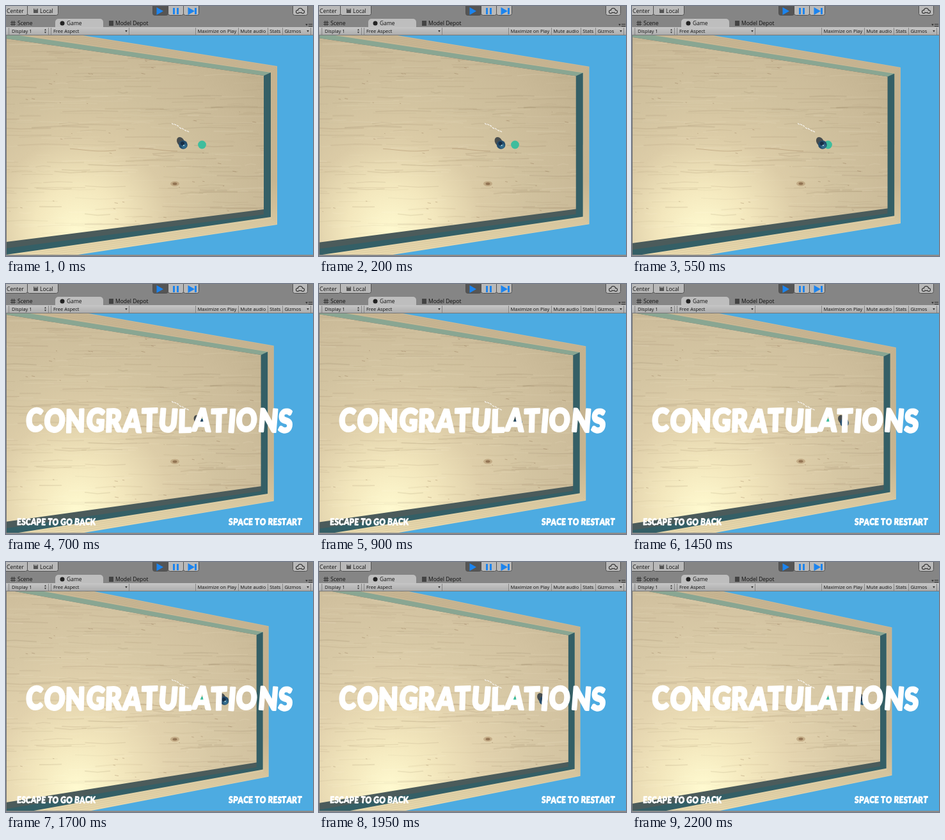
Animation, 480 px wide and 391 px high, one loop 2.25 s. Source, as an HTML page with a canvas:

```html
<!DOCTYPE html>
<html lang="en">
<head>
<meta charset="utf-8">
<title>Tray game</title>
<style>
html, body { margin: 0; width: 100%; height: 100%; overflow: hidden; background: #4dabe1; }
canvas { display: block; }
</style>
</head>
<body>
<canvas id="stage" width="480" height="391"></canvas>
<script>
const c = document.getElementById('stage').getContext('2d');
const LOOP = 2250, STEP = 50, WIN_AT = 700;
let turn = 0; // how far the tray has turned, 0 to 1

function random(seed) {
  return () => (seed = (seed * 16807) % 2147483647) / 2147483647;
}

// Tray coordinates to stage coordinates as the camera turns
function project([x, y]) {
  return [
    x - 15 * turn * Math.max(0, x - 280) / 123,
    217 + (y - 217) * (1 + turn * (0.06 - 0.12 * x / 403))
  ];
}

function fillPath(fill, points) {
  c.beginPath();
  points.forEach(p => c.lineTo(...p));
  c.fillStyle = fill;
  c.fill();
}

function stroke(color, width, ...points) {
  c.beginPath();
  points.forEach(p => c.lineTo(...project(p)));
  c.strokeStyle = color;
  c.lineWidth = width;
  c.stroke();
}

// A tray outline: open at the left border, upright at the right
function panel(fill, right, top, bottom, leftTop, leftBottom) {
  fillPath(fill, [[0, leftTop], [right, top], [right, bottom], [0, leftBottom]].map(project));
}

function rect(fill, x, y, w, h) {
  c.fillStyle = fill;
  c.fillRect(x, y, w, h);
}

function disc(fill, x, y, rx, ry = rx, angle = 0) {
  c.fillStyle = fill;
  c.beginPath();
  c.ellipse(x, y, rx, ry, angle, 0, 7);
  c.fill();
}

function triangle(fill, x, y, r, angle) {
  const corner = k => [x + r * Math.cos(angle + k * 2.094), y + r * Math.sin(angle + k * 2.094)];
  fillPath(fill, [0, 1, 2].map(corner));
}

function label(text, x, y, size = 7.5) {
  c.font = `${size}px "Open Sans", "Noto Sans", sans-serif`;
  c.fillStyle = '#111';
  c.fillText(text, x, y);
  return c.measureText(text).width;
}

// Spread the colours evenly over a gradient
function blend(gradient, ...colors) {
  colors.forEach((color, i) => gradient.addColorStop(i / (colors.length - 1), color));
  return gradient;
}

function drawGrain() {
  const rnd = random(417);
  for (let i = 0; i < 420; i++) {
    const x = rnd() * 440 - 40, y = 46 + rnd() * 335, len = 15 + rnd() * 80;
    const bend = rnd() * 5 - 2.5, alpha = 0.03 + rnd() * 0.09;
    const color = rnd() < 0.6 ? `rgba(110,88,60,${alpha})` : `rgba(255,244,220,${alpha})`;
    stroke(color, 0.7 + rnd() * 1.6, [x, y], [x + len / 2, y + bend], [x + len, y + bend * 0.4]);
  }
  for (let i = 0; i < 40; i++) {
    const x = rnd() * 390, y = 70 + rnd() * 270, len = 1 + rnd() * 5;
    stroke('rgba(110,75,45,.3)', 0.9, [x, y], [x + len, y + len * 0.2]);
  }
  // broken dark vein across the middle
  for (let x = 70; x < 265; x += 6)
    if (Math.sin(x / 17) > -0.6)
      stroke('rgba(125,82,45,.35)', 0.8, [x, 225 + 2 * Math.sin(x / 19)], [x + 6, 225 + 2 * Math.sin(x / 19 + 0.3)]);
  const [kx, ky] = project([264, 278]);
  disc('rgba(140,100,62,.3)', kx, ky, 7, 4);
  disc('rgba(100,62,35,.5)', kx, ky, 3.5, 2);
  for (let i = 0; i < 7; i++) {
    const x = 259 + i * 4, y = 182 + i * 2.2 + rnd() * 2;
    stroke('rgba(255,255,255,.85)', 1.2, [x, y], [x + 3, y + 1.8]);
  }
}

function drawTray() {
  rect('#4dabe1', 0, 46, 480, 345);
  panel(blend(c.createLinearGradient(0, 46, 0, 389), '#c8b693', '#c9b794', '#cbb995', '#e8d9ad'),
    424, 94, 342, 27, 406);
  for (let d = 2; d < 10; d += 2)
    stroke('rgba(130,105,70,.14)', 0.7, [0, 27 + d * 1.5], [424 - d, 94 + d], [424 - d, 342 - d], [0, 406 - d * 1.8]);
  panel('#89a692', 414, 104, 217, 43, 217);
  fillPath('#345f66', [[403, 109], [414, 104], [414, 330], [0, 389], [0, 217]].map(project));
  panel('#4b5b5b', 403, 109, 326, 51, 379);

  const light = 10 * turn;
  const tone = (r, g, b) => `rgb(${r + light},${g + light},${b + light})`;
  const glow = blend(c.createRadialGradient(110, 355, 0, 130, 330, 350),
    '#fffad0', '#f3e7bd', tone(218, 202, 165), tone(207, 192, 157), tone(201, 185, 151), tone(192, 176, 142));
  c.save();
  panel(glow, 403, 109, 318, 51, 369);
  c.clip();
  drawGrain();
  c.restore();
}

function drawBall(t) {
  const x = 277 + 0.038 * t;
  disc('#3fbd9d', 306.5, 217, 6.4);
  disc('rgba(48,56,63,.85)', x - 4, 212, 5.5, 7.5, -0.5);
  disc('#254d6d', x, 217, 6.8);
  disc('#326b8b', x + 1.5, 219, 3.8);
  disc('#182f47', x - 1, 215, 3);
  disc('#c6e3ee', x + 1, 218, 1);
}

// Chunky lettering in a tall face with a slight wobble
function cartoon(text, x, y, size) {
  c.font = `900 ${size}px Lato, "Open Sans", sans-serif`;
  c.fillStyle = c.strokeStyle = '#fff';
  c.lineWidth = size * 0.06;
  c.lineJoin = 'round';
  [...text].forEach((letter, i) => {
    const w = c.measureText(letter).width;
    c.save();
    c.translate(x + w / 2, y + (i % 3 - 1) * size * 0.02);
    c.transform(1, 0, -0.06, 1.22, 0, 0);
    c.rotate(i % 2 ? 0.04 : -0.03);
    c.fillText(letter, -w / 2, 0);
    c.strokeText(letter, -w / 2, 0);
    c.restore();
    x += w + size * 0.03;
  });
}

function button(x, w, fill = '#b9b9b9') {
  c.beginPath();
  c.roundRect(x + 0.5, -4, w, 18.5, 3);
  c.fillStyle = fill;
  c.fill();
  c.strokeStyle = '#505050';
  c.lineWidth = 1;
  c.stroke();
}

function drawToolbar() {
  rect('#858585', 0, 0, 480, 46);
  button(-5, 38);
  button(33, 48);
  label('Center', 1, 11, 8.6);
  rect('#555', 43, 4, 7, 7);
  rect('#999', 44, 4, 5, 2);
  label('Local', 53, 11, 8.6);

  const blue = '#1c84ee';
  button(229, 24, '#555');
  button(253, 24);
  button(277, 24);
  triangle(blue, 239, 8, 7, 0);
  rect(blue, 261, 3, 3, 10);
  rect(blue, 267, 3, 3, 10);
  triangle(blue, 288, 8, 7, 0);
  rect(blue, 295, 3, 3, 10);

  button(448, 23);
  for (const [color, grow] of [['#222', 1], ['#b9b9b9', 0]])
    for (let i = 0; i < 3; i++) disc(color, 456 + i * 4, 9 - i % 2 * 2, 2 + i % 2 + grow);

  c.beginPath();
  c.roundRect(77, 20, 75, 16, [5, 5, 0, 0]);
  c.fillStyle = '#bebebe';
  c.fill();
  for (const d of [0, 3]) {
    rect('#333', 9 + d, 23, 1, 8);
    rect('#333', 7, 25 + d, 8, 1);
    rect('#333', 473, 28 + d, 6, 1);
  }
  label('Scene', 18, 30, 8.5);
  disc('#222', 88, 27, 3.5);
  label('Game', 95, 30, 8.5);
  rect('#444', 161, 23, 7, 8);
  label('Model Depot', 171, 30, 8.5);
  triangle('#333', 470, 29, 2, Math.PI / 2);

  rect(blend(c.createLinearGradient(0, 33, 0, 46), '#c6c6c6', '#acacac'), 0, 33, 480, 13);
  rect('#777', 0, 45, 480, 1);
  const divider = x => rect('#858585', x, 34, 1, 11);
  [4, 66, 70, 192, 476].forEach(divider);
  label('Display 1', 9, 42);
  triangle('#333', 61.5, 37.5, 1.7, -Math.PI / 2);
  triangle('#333', 61.5, 41, 1.7, Math.PI / 2);
  label('Free Aspect', 74, 42);
  triangle('#333', 188, 39, 2, Math.PI / 2);
  let x = 296;
  for (const text of ['Maximize on Play', 'Mute audio', 'Stats', 'Gizmos']) {
    divider(Math.round(x));
    x += label(text, x + 3.5, 42) + 6;
  }
  triangle('#333', 472, 39, 2, Math.PI / 2);
}

function draw(now) {
  const t = Math.floor(now % LOOP / STEP) * STEP;
  const u = t / (LOOP - STEP);
  turn = 0.9 * u + 0.1 * u * u;
  drawTray();
  drawBall(t);
  if (t >= WIN_AT) {
    cartoon('CONGRATULATIONS', 31, 231, 40);
    cartoon('ESCAPE TO GO BACK', 17, 377, 11.6);
    cartoon('SPACE TO RESTART', 348, 377, 11.6);
  }
  drawToolbar();
  rect('#777', 0, 46, 1, 345);
  rect('#8a8a8a', 0, 389, 480, 2);
}

const start = performance.now();
function tick() {
  draw(performance.now() - start);
  requestAnimationFrame(tick);
}
tick();
</script>
</body>
</html>
```
